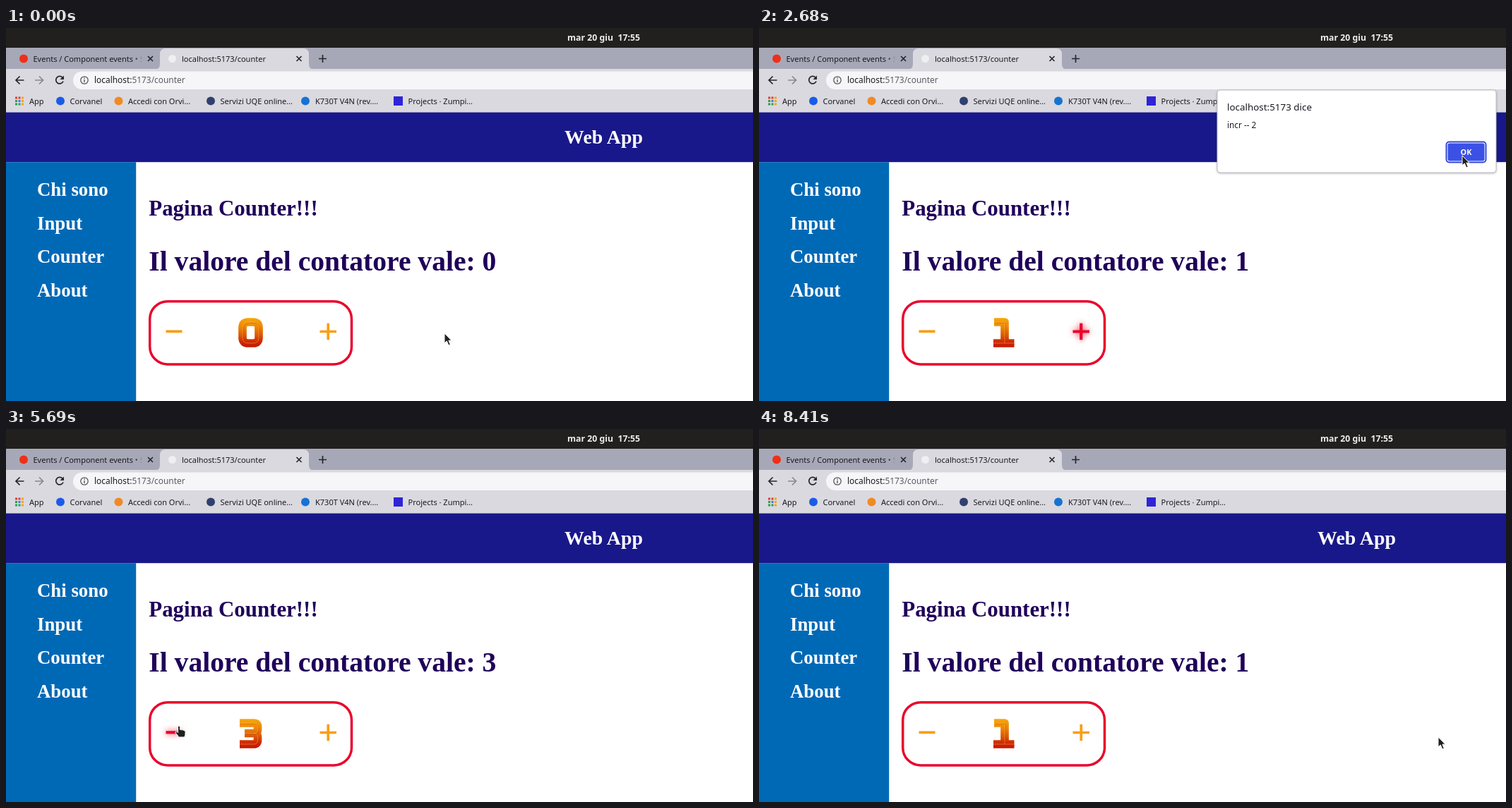
An HTML page for the animation above (9.39 s loop, 1058 by 529 pixels).

```html
<!DOCTYPE html>
<html lang="it">
<head>
<meta charset="utf-8">
<title>Counter</title>
<style>
  html, body { margin: 0; width: 100%; height: 100%; overflow: hidden; background: #fff; }
  svg { display: block; width: 100vw; height: 100vh; }
  text { font-family: "Noto Sans", "Open Sans", sans-serif; white-space: pre; }
  .page text { font-family: "Liberation Serif", "Times New Roman", serif; font-weight: 700; }
  .menu { font-size: 26.8px; fill: #fff; }
  .ink { fill: #1f0059; }
  .small { font-size: 11px; fill: #1a1a20; }
  .line { fill: none; stroke: #26262c; stroke-width: 1.7; }
  .sign { fill: none; stroke: #fa9d12; stroke-width: 3.7; }
  .sign.hot { stroke: #e8062c; stroke-width: 4.2; filter: drop-shadow(0 0 4px #f0304a); }
  .cursor { fill: #202020; stroke: #fff; stroke-width: 1; stroke-linejoin: round; }
</style>
</head>
<body>
<svg viewBox="0 0 1058 529">
  <defs>
    <linearGradient id="fire" gradientUnits="userSpaceOnUse" x1="0" y1="411" x2="0" y2="453">
      <stop offset="0" stop-color="#f7a80a"/>
      <stop offset=".3" stop-color="#ee8808"/>
      <stop offset=".58" stop-color="#dc5a06"/>
      <stop offset=".8" stop-color="#d02a04"/>
      <stop offset="1" stop-color="#c41602"/>
    </linearGradient>
    <linearGradient id="fade">
      <stop offset="0" stop-color="#a7a8b7" stop-opacity="0"/>
      <stop offset="1" stop-color="#a7a8b7"/>
    </linearGradient>
  </defs>

  <rect width="1058" height="28" fill="#221f1f"/>
  <text x="846.5" y="18" font-size="12.3" font-weight="700" fill="#ededed" text-anchor="middle">mar 20 giu  17:55</text>

  <rect y="28" width="1058" height="31" fill="#a7a8b7"/>
  <path d="M210 59Q218 59 218 51V37Q218 29 226 29H421Q429 29 429 37V51Q429 59 437 59Z" fill="#dad9df"/>
  <circle cx="25" cy="43.5" r="6" fill="#ef2f17"/>
  <circle cx="235.5" cy="43.5" r="5.5" fill="#efeff2"/>
  <text class="small" x="38.5" y="47.5">Events / Component events • S</text>
  <rect x="180" y="32" width="14" height="24" fill="url(#fade)"/>
  <rect x="193" y="32" width="17" height="24" fill="#a7a8b7"/>
  <text class="small" x="249" y="47.5">localhost:5173/counter</text>
  <path class="line" d="M201 40l7 7m0-7l-7 7M411.5 40l7 7m0-7l-7 7M443 43.5h11m-5.5-5.5v11"/>

  <rect y="58" width="1058" height="62" fill="#dad9df"/>
  <rect x="95" y="61.5" width="1000" height="25.5" rx="12.75" fill="#f6f6f9"/>
  <path class="line" d="M25.5 74H14m5.5-5.5L14 74l5.500 5.5"/>
  <path class="line" style="stroke:#88888f" d="M41 74h11.5m-5.5-5.5l5.5 5.5-5.5 5.5"/>
  <path class="line" d="M80.3 70.5A5.300 5.300 0 1 0 81 75.5"/>
  <path d="M82 67.5v5.5h-5.5z" fill="#26262c"/>
  <circle class="line" cx="111" cy="74" r="5.2" style="stroke:#55565c;stroke-width:1.3"/>
  <path class="line" style="stroke:#55565c;stroke-width:1.4" d="M111 73v4m0-6.5v1.4"/>
  <text x="125" y="78" font-size="11.9" fill="#1a1a20">localhost:<tspan fill="#5a5b62">5173/counter</tspan></text>

  <g id="apps"></g>
  <g id="bookmarks"></g>

  <g class="page">
    <rect y="119.6" width="1058" height="410" fill="#fff"/>
    <rect y="119.6" width="1058" height="70.6" fill="#19188a"/>
    <rect y="190.2" width="184.2" height="339" fill="#0069b6"/>
    <text x="846.5" y="164" font-size="27.9" fill="#fff" text-anchor="middle">Web App</text>
    <text class="menu" x="44" y="238">Chi sono</text>
    <text class="menu" x="44" y="285.5">Input</text>
    <text class="menu" x="44" y="333">Counter</text>
    <text class="menu" x="44" y="380.5">About</text>
    <text class="ink" x="202.3" y="266" font-size="30.9">Pagina Counter!!!</text>
    <text class="ink" x="202.3" y="343.5" font-size="39.6" id="total"></text>
    <rect x="203.7" y="387.7" width="285.8" height="89.2" rx="25" fill="none" stroke="#e8062c" stroke-width="3.5"/>
    <path class="sign" id="minus" d="M226.5 430.3h23"/>
    <path class="sign" id="plus" d="M444.5 430.5h23.5m-11.75-11.7v23.4"/>
    <g fill="none" stroke-linejoin="round">
      <path id="digit" stroke="url(#fire)" stroke-width="11.7"/>
      <path id="shade" stroke="#a92a00" stroke-opacity=".25" stroke-width="1" transform="translate(1.5 1.5)"/>
      <path id="shine" stroke="#ffb347" stroke-opacity=".6" stroke-width=".8"/>
    </g>
  </g>

  <g id="dialog">
    <rect x="649" y="88" width="395" height="117" rx="4" fill="#fff" stroke="#c0c0c8" stroke-width="1" style="filter:drop-shadow(0 1px 1.5px #0004)"/>
    <text x="663" y="117" font-size="13.4" fill="#1a1a20">localhost:5173 dice</text>
    <text id="message" x="663" y="142.3" font-size="11.8" fill="#1f1f25"></text>
    <rect x="973.5" y="161.5" width="56" height="29" rx="4" fill="#fff" stroke="#3349d8" stroke-width="2"/>
    <rect x="975.5" y="163.5" width="52" height="25" rx="2.5" fill="#3b51e6"/>
    <text x="1001.5" y="180" font-size="10.8" font-weight="600" fill="#fff" text-anchor="middle">OK</text>
  </g>

  <g class="cursor" id="cursor">
    <path id="arrow" d="M0 0V14L3.3 11 5.8 17 8.3 16 5.9 10.2H10Z"/>
    <path id="hand" d="M-1.5 1Q0-1 1.5 1V5.5Q3 4.5 4 6 5.5 5 6.5 6.5 9 6 9 8.5V12Q9 14 7.5 16H-.5Q-2 12.5-5 10-5.5 7.5-3 8.3L-1.5 9.5Z"/>
  </g>
</svg>
<script>
const LOOP = 9390;
const el = id => document.getElementById(id);

// Cursor stops: time, x, y
const route = [
  [0, 621, 433], [50, 621, 433], [200, 548, 441], [420, 456, 431], [660, 456, 431],
  [1080, 1003, 178], [1300, 1003, 178], [1830, 482, 400], [1920, 470, 428], [2130, 456, 429],
  [2380, 456, 429], [2700, 1002, 178], [2850, 1002, 178], [3210, 560, 385], [3350, 500, 463],
  [3500, 475, 427], [3700, 457, 430], [3870, 457, 430], [4250, 985, 215], [4550, 1006, 191],
  [4640, 1003, 180], [4760, 1003, 180], [5150, 273, 420], [5350, 245, 421], [6130, 245, 421],
  [6420, 1002, 178], [6560, 1002, 178], [6900, 200, 466], [7030, 255, 430], [7320, 240, 427],
  [7560, 240, 427], [7880, 1002, 178], [8030, 1002, 178], [8410, 962, 437], [LOOP, 962, 437]
];

const dialogs = [
  { open: 600, close: 1200, button: "plus", value: 1 },
  { open: 2320, close: 2800, button: "plus", value: 2 },
  { open: 3800, close: 4700, button: "plus", value: 3 },
  { open: 5860, close: 6520, button: "minus", value: 2 },
  { open: 7500, close: 7980, button: "minus", value: 1 }
];

const digits = [
  "M343 417H350Q358 417 358 425V439Q358 447 350 447H343Q335 447 335 439V425Q335 417 343 417Z",
  "M333 417H348V447M332 447H361.5",
  "M331 417H351Q356.5 417 356.5 422V427Q356.5 431.5 351 431.5H342Q337 431.5 337 436V447H362",
  "M331 417H351Q356.5 417 356.5 422V426Q356.5 431.5 351 431.5H338M351 431.5Q356.5 432 356.5 437V441Q356.5 447 351 447H331"
];

el("apps").innerHTML = ["#e33b2e", "#e33b2e", "#f2a60c", "#2e9e4f", "#3f7be0", "#f2a60c", "#2e9e4f", "#2e9e4f", "#f2a60c"]
  .map((c, i) => `<rect x="${13 + i % 3 * 4.5}" y="${97.5 + Math.floor(i / 3) * 4.5}" width="3" height="3" fill="${c}"/>`).join("");

el("bookmarks").innerHTML = [
  [33, "App"],
  [90.5, "Corvanel", 77, "#1b5be8"],
  [173, "Accedi con Orvi…", 159.5, "#f08a24"],
  [303.5, "Servizi UQE online…", 290, "#30406f"],
  [438, "K730T V4N (rev.…", 424, "#1673d1"],
  [569.5, "Projects · Zumpi…", 555.5, "#2e24d8", "square"]
].map(([x, label, cx, color, shape]) => `<text class="small" x="${x}" y="107.5">${label}</text>` +
  (!color ? "" : shape ? `<rect x="${cx - 6.5}" y="97" width="13" height="13" fill="${color}"/>`
    : `<circle cx="${cx}" cy="103.5" r="6" fill="${color}"/>`)).join("");

// The harmonic mean of both speeds keeps the path from overshooting and slows it near each stop.
function slope(i, axis) {
  const speed = k => (route[k + 1][axis] - route[k][axis]) / (route[k + 1][0] - route[k][0]);
  if (i === 0 || i === route.length - 1) return 0;
  const before = speed(i - 1), after = speed(i);
  return before * after <= 0 ? 0 : 2 * before * after / (before + after);
}

function position(t) {
  const i = route.findIndex(stop => stop[0] > t) - 1;
  const a = route[i], b = route[i + 1], span = b[0] - a[0], u = (t - a[0]) / span;
  const ease = u * u * (3 - 2 * u);
  return [1, 2].map(axis => a[axis] + (b[axis] - a[axis]) * ease +
    span * u * (1 - u) * (slope(i, axis) * (1 - u) - slope(i + 1, axis) * u));
}

function buttonAt(x, y) {
  if (y < 418 || y > 443) return "";
  return x > 443 && x < 469 ? "plus" : x > 225 && x < 251 ? "minus" : "";
}

const show = (id, on) => el(id).style.display = on ? "" : "none";

function draw(time) {
  const t = time % LOOP;
  const [x, y] = position(t);
  const dialog = dialogs.find(d => t >= d.open && t < d.close);
  const count = dialogs.reduce((n, d) => t >= d.close ? d.value : n, 0);
  const under = buttonAt(x, y), hot = dialog ? dialog.button : under;

  el("total").textContent = "Il valore del contatore vale: " + count;
  for (const id of ["digit", "shade", "shine"]) el(id).setAttribute("d", digits[count]);
  for (const id of ["minus", "plus"]) el(id).classList.toggle("hot", hot === id);
  show("dialog", dialog);
  if (dialog) el("message").textContent = `${dialog.button === "plus" ? "incr" : "decr"} -- ${dialog.value}`;
  show("hand", under);
  show("arrow", !under);
  el("cursor").setAttribute("transform", `translate(${Math.round(x)} ${Math.round(y)})`);
}

const start = performance.now();
function tick(now) {
  draw(Math.max(0, now - start));
  requestAnimationFrame(tick);
}
draw(0);
requestAnimationFrame(tick);
</script>
</body>
</html>
```
